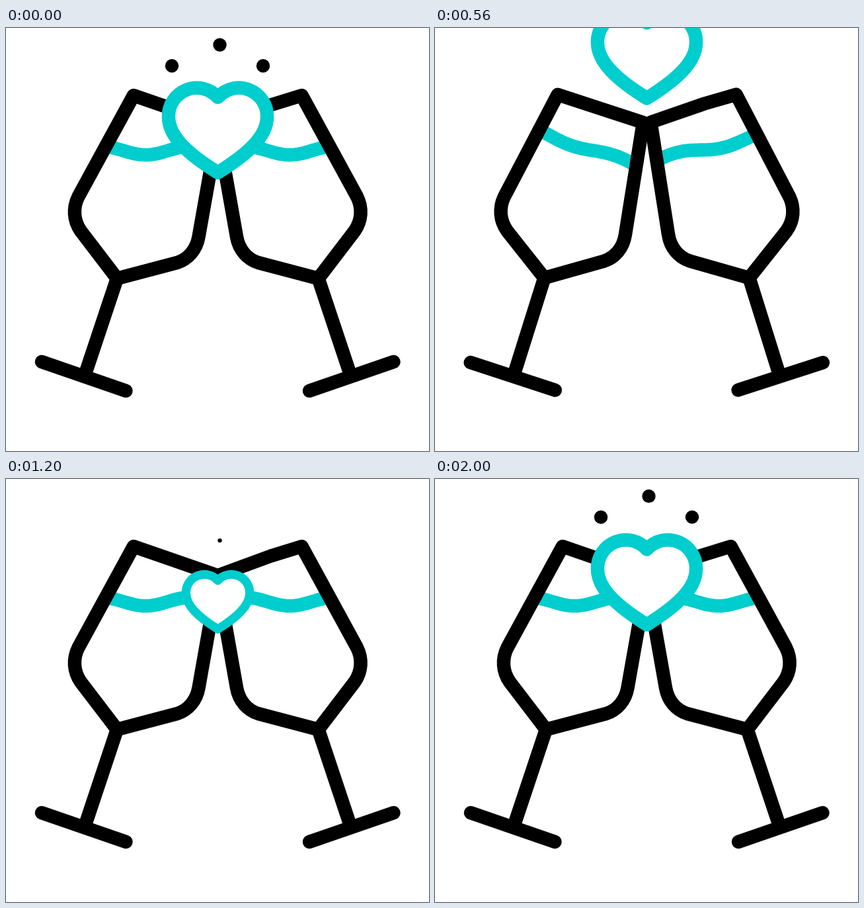
An HTML page with a canvas for the animation above (2040 ms loop, 640 by 640 pixels).

```html
<!DOCTYPE html>
<html>
<head>
<meta charset="utf-8">
<style>
html, body { margin: 0; width: 100%; height: 100%; overflow: hidden; background: #fff; }
canvas { display: block; width: 640px; height: 640px; }
</style>
</head>
<body>
<canvas id="stage" width="640" height="640"></canvas>
<script>
const ctx = document.getElementById('stage').getContext('2d');
const LOOP = 2040, CLINK = 1140;
const TEAL = '#00cdcd', BLACK = '#000', WHITE = '#fff';
const PIVOT = { x: 118, y: 527 };

const bowlPath = rimY => new Path2D(`M193 102L240 ${rimY}L321.5 146.5L291.5 316
  C288 336 275 350 259 355L168 379L113 307C102 291 101 272 109.5 255Z`);
const foot = new Path2D('M168 379L119 526M54 505L181.5 549');
const heart = new Path2D(`M320.5 105A42.7 42.7 0 0 0 246 135C246 165 277 192 320.5 219
  C364 192 395 165 395 135A42.7 42.7 0 0 0 320.5 105Z`);

// swing: degrees, tilt: rise of the liquid across the bowl; both as [time, value] keys
const glasses = [
  {
    bowl: bowlPath(118.2),
    swing: [[0, 0], [320, 6.9], [640, 0], [880, 3.3], [1136, 0]],
    tilt: [[0, 0], [240, 35], [560, 60], [920, 92], [1136, 0]]
  },
  {
    mirror: true,
    bowl: bowlPath(116.5),
    swing: [[0, 0], [320, 7.7], [640, 0], [880, 2.1], [1136, 0]],
    tilt: [[0, 0], [240, 46], [560, 42], [920, 92], [1136, 0]]
  }
];
const dots = [
  { x: 323.5, y: 25.5, speed: .084, start: 1160, end: 180 },
  { x: 389, y: 57.3, speed: .0636, start: 1300, end: 200 },
  { x: 251, y: 57.3, speed: .08, start: 1445, end: 220 }
];

const clamp = v => Math.min(1, Math.max(0, v));
const linear = u => u;
const easeInOut = u => (1 - Math.cos(Math.PI * u)) / 2;
const easeOut = u => 1 - (1 - u) ** 2;

function valueAt(keys, t, ease) {
  const next = keys.findIndex(([time]) => time > t);
  if (next < 0) return keys[keys.length - 1][1];
  const [t0, v0] = keys[next - 1], [t1, v1] = keys[next];
  return v0 + (v1 - v0) * ease((t - t0) / (t1 - t0));
}

// A sine wave that flattens and sinks as the liquid tilts
function drawLiquid(tilt) {
  const level = 185.5 - .06 * tilt;
  const height = 6.5 - .038 * tilt;
  ctx.beginPath();
  for (let u = 0; u <= 1.05; u += .02) {
    const wave = Math.sin(2 * Math.PI * (u - .17) / .85);
    ctx.lineTo(150 + 160 * u, level + tilt * (u - .5) + height * wave);
  }
  ctx.strokeStyle = TEAL;
  ctx.stroke();
}

function drawGlass({ mirror, bowl, swing, tilt }, t) {
  ctx.save();
  if (mirror) {
    ctx.translate(640.5, 0);
    ctx.scale(-1, 1);
  }
  ctx.translate(PIVOT.x, PIVOT.y);
  ctx.rotate(-valueAt(swing, t, easeInOut) * Math.PI / 180);
  ctx.translate(-PIVOT.x, -PIVOT.y);

  ctx.save();
  ctx.clip(bowl);
  drawLiquid(valueAt(tilt, t, linear));
  ctx.restore();

  ctx.strokeStyle = BLACK;
  ctx.stroke(bowl);
  ctx.stroke(foot);
  ctx.restore();
}

function drawDot({ x, y, speed, start, end }, t) {
  const leaving = t < CLINK;
  const size = leaving ? 1 - clamp((t - end) / 120) : clamp((t - start) / 130);
  const drop = leaving ? 0 : Math.max(0, 2006 - t) * speed;
  ctx.fillStyle = BLACK;
  ctx.beginPath();
  ctx.arc(x, y + drop, 10.2 * size, 0, 2 * Math.PI);
  ctx.fill();
}

function drawHeart(t) {
  const leaving = t < CLINK;
  const drop = leaving ? -.201 * t : (LOOP - t) * .0365;
  const size = leaving ? 1 : easeOut(clamp((t - 1120) / 200));
  ctx.save();
  ctx.translate(320.5, 155.7 + drop);
  ctx.scale(size, size);
  ctx.translate(-320.5, -155.7);
  ctx.fillStyle = WHITE;
  ctx.strokeStyle = TEAL;
  ctx.fill(heart);
  ctx.stroke(heart);
  ctx.restore();
}

function draw(t) {
  ctx.fillStyle = WHITE;
  ctx.fillRect(0, 0, 640, 640);
  glasses.forEach(glass => drawGlass(glass, t));
  dots.forEach(dot => drawDot(dot, t));
  drawHeart(t);
}

ctx.lineWidth = 20.5;
ctx.lineCap = ctx.lineJoin = 'round';
const begin = performance.now();
function tick() {
  draw((performance.now() - begin) % LOOP);
  requestAnimationFrame(tick);
}
tick();
</script>
</body>
</html>
```
